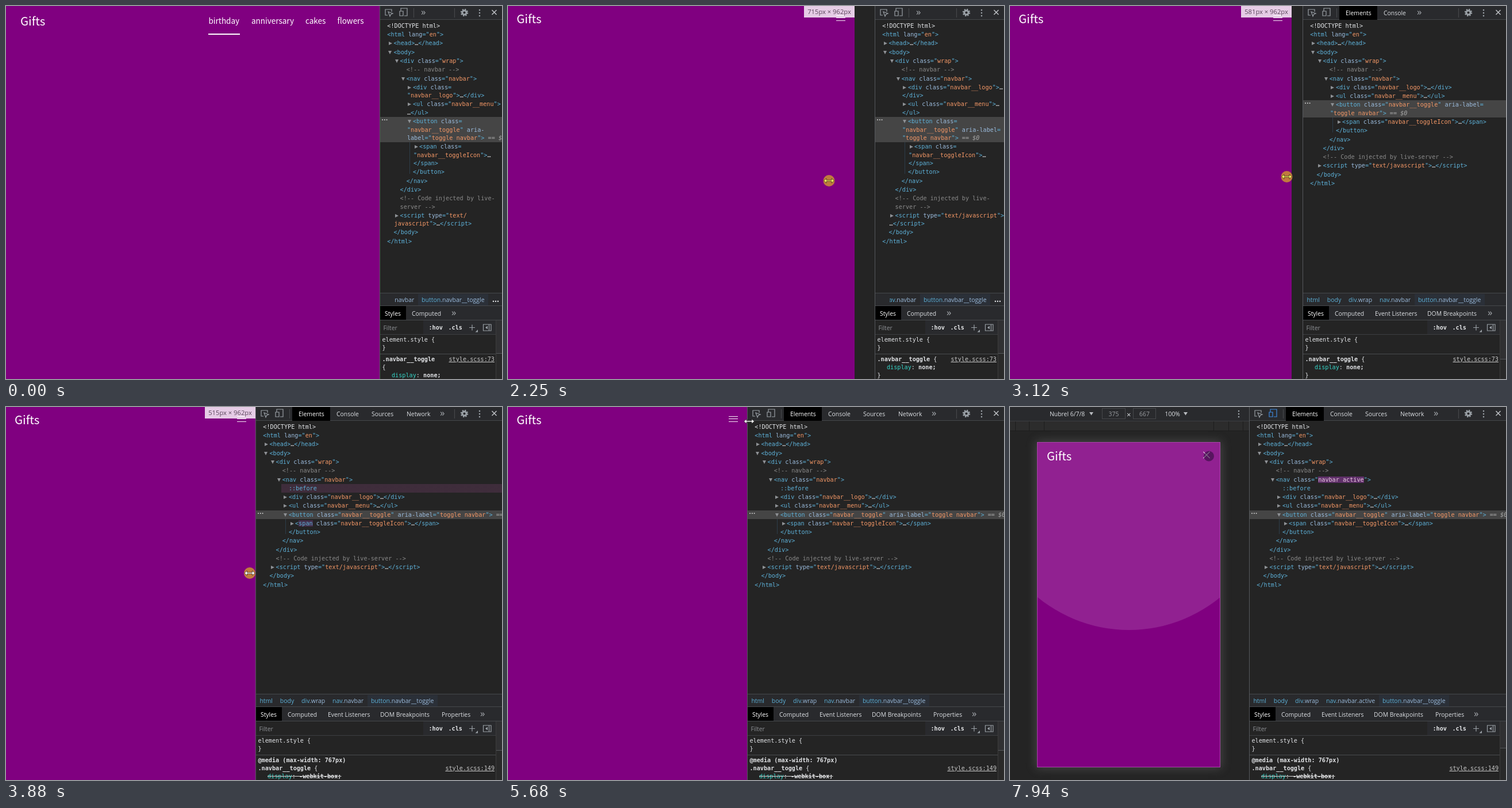
Write an HTML page that moves like this. It is 863x649 px and loops after 8 s.

```html
<!DOCTYPE html>
<html lang="en">
<head>
<meta charset="utf-8">
<title>Responsive navbar in the inspector</title>
<style>
html, body { margin: 0; width: 100%; height: 100%; overflow: hidden; background: #242424; }
#stage { position: relative; width: 863px; height: 649px; overflow: hidden; background: #242424;
  font: 10.4px/20px "Open Sans", "Noto Sans", sans-serif; color: #dcdfe3; }
#stage div, #stage svg, .at { position: absolute; }
#stage .tree div, #stage .rule div, #stage .crumbs div { position: relative; }
.at { white-space: pre; }
.hide { display: none !important; }
svg { overflow: visible; fill: none; stroke: #9aa0a6; stroke-width: 1.2; }

.page { background: purple; overflow: hidden; color: #fff;
  font-family: "Noto Sans CJK JP", "Noto Sans CJK SC", "Noto Sans", sans-serif; }
.page.device { border: 1px solid #a845a8; box-shadow: 0 0 16px 2px rgba(150, 150, 150, .3); }
.device .logo, .device .burger { transform: translate(1px, 1px); }
.logo { font-size: 20.4px; }
.menu { font-size: 13.5px; }
.line { left: 352px; top: 48px; width: 55px; height: 2px; background: #fff; }
.wave { border-radius: 50%; background: rgba(255, 255, 255, .13); }
.burger { top: 15px; width: 16px; height: 11px; }
.burger div { width: 16px; height: 1.2px; background: #f2e6f2; }
.badge { top: 0; width: 88px; height: 20px; background: rgba(255, 255, 255, .8); color: #5c465c;
  text-align: center; font: 11.2px/20px "Open Sans", sans-serif; }

.emu { width: 416px; height: 649px; background: #242424; }
.bar { left: 0; right: 0; background: #292a2d; box-sizing: border-box; }
.box { top: 2px; height: 17px; border: 1px solid #46484b; color: #9a9da1; line-height: 18px; text-align: center; }
.tick { top: 25px; width: 1px; height: 16px; background: #1d1d1d; }

.panel { top: 0; right: 0; bottom: 0; background: #242424; overflow: hidden; }
.edge { left: 0; top: 0; bottom: 0; width: 1px; background: #55585c; }
.sel { background: #000; color: #fff; }
.mono, .tree, .rule { font: 10.17px/14.4px "DejaVu Sans Mono", "Noto Sans Mono", monospace; }
.tree { left: 0; right: -2px; top: 27.1px; }
.tree div { padding: .87px 0 0; }
.t { color: #5db0d7; } .k { color: #9bbbdc; } .v { color: #f29766; } .c { color: #898989; }
.w { color: #e3e5e8; } .nw { white-space: nowrap; }
.tri { display: inline-block; width: 10px; height: 8px; }
.tri::before { content: ""; display: inline-block; border: solid transparent; border-width: 3.5px 0 3.5px 6px; border-left-color: #8e9195; margin-left: 1.5px; }
.tri.o::before { border-color: #8e9195 transparent transparent; border-width: 6px 3.5px 0; margin-left: 1px; }
.picked { background: #454545; }
.picked::before { content: "···"; position: absolute; left: 2px; top: -1px; color: #c8c8c8; letter-spacing: -2.4px; font-weight: bold; }
.picked em { position: absolute; white-space: pre; color: #a8a8a8; }
.guide { width: 1px; height: 28px; background: #2d3d4a; }
.crumbs { left: 1px; top: 501px; height: 20px; overflow: hidden; display: flex; font-size: 10.5px; }
.crumbs div { padding: 0 6.4px; flex: none; line-height: 21px; }
.crumbs div:last-child { background: #2b3038; }
.rule { left: 4.5px; right: 13px; line-height: 14px; color: #e0e2e5; }
.rule u { float: right; margin-left: 16px; color: #c6c6c6; }
.rule .p { padding-left: 16.5px; }
.p span { color: #35d4c7; }
.rule s { text-decoration-color: #ddd; }
</style>
</head>
<body>
<div id="stage">
  <div class="emu" id="emu"></div>
  <div class="page" id="page">
    <div class="wave" id="wave"></div>
    <div class="logo at" id="logo">Gifts</div>
    <div class="menu" id="menu"><div class="line"></div></div>
    <div class="burger" id="burger"><div></div><div></div><div></div></div>
  </div>
  <div class="badge at" id="badge"></div>
  <div class="panel" id="panel">
    <div class="bar" style="top:0;height:24px;border-bottom:1px solid #45484b"></div>
    <svg id="tools" width="70" height="24">
      <path d="M21 10V6H10v10h4M15 10l8 3-3.4 1.4L18 18z"/>
      <path id="dev" d="M37 9V4h11v13h-5M35 9h6v8h-6z"/>
      <path d="M59.5 4v16" stroke="#46484b"/>
    </svg>
    <div class="tree" id="tree"></div>
    <div class="guide" id="guide"></div>
    <div class="bar" style="top:499px;height:23px;border:solid #45484b;border-width:1px 0"></div>
    <div class="crumbs" id="crumbs"></div>
    <div class="bar" id="cover" style="top:501px;width:26px;height:20px"></div>
    <div class="bar" style="top:522px;height:25px;border-bottom:1px solid #45484b"></div>
    <div class="bar" style="top:547px;height:25px;border-bottom:1px solid #3c3e41;background:#242424"></div>
    <div id="tabs" style="left:0;top:0"></div>
    <div class="rule" style="top:574px">element.style {<br>}</div>
    <div style="left:0;right:11px;top:605px;height:1px;background:#4a4c4f"></div>
    <div class="rule" id="plain" style="top:608px"><u>style.scss:73</u><b>.navbar__toggle</b> {<div class="p"><span>display</span>: <b>none;</b></div>}</div>
    <div class="rule" id="media" style="top:608px"><b>@media (max-width: 767px)</b><br><u>style.scss:149</u><b>.navbar__toggle</b> {<div class="p"><s><span>display</span>: <b>-webkit-box;</b></s></div></div>
    <div class="edge"></div>
  </div>
  <div id="right" style="left:0;top:0"></div>
  <svg id="cursor" width="1" height="1">
    <circle id="ring" r="10" stroke="none"/>
    <path id="arrow" d="M0 0V14.5L3.4 11.4 5.6 16.6 8 15.6 5.8 10.5H10.4Z" fill="#fff" stroke="#222" stroke-width=".8"/>
    <path id="resize" d="M-9 0l4.500-4v3h9v-3l4.500 4-4.500 4v-3h-9v3z" stroke="#111" stroke-width=".6"/>
  </svg>
</div>
<script>
const $ = id => document.getElementById(id);
const show = (el, on) => el.classList.toggle('hide', !on);
const put = (box, x, y, text, cls = '', css = '') => {
  const el = document.createElement('div');
  el.className = 'at ' + cls;
  el.style.cssText = `left:${x}px;top:${y - 10}px;line-height:20px;${css}`;
  el.innerHTML = text;
  $(box).append(el);
  return el;
};

// Page and emulator
[['birthday', 352.5], ['anniversary', 427], ['cakes', 521], ['flowers', 576.5]]
  .forEach(([word, x]) => put('menu', x, 24.5, word));
const drop = x => `<svg style="left:${x}px;top:9px" width="8" height="6"><path d="M0 0h7l-3.5 5.5z" fill="#b8bbbf" stroke="none"/></svg>`;
$('emu').innerHTML = `<div class="bar" style="top:0;height:25px;border-bottom:1px solid #3c3e41"></div>
  <div class="bar" style="top:25px;height:17px;background:#2c2c2c;border-bottom:1px solid #1d1d1d"></div>
  <div class="box" style="left:160px;width:39px">375</div><div class="box" style="left:214px;width:38px">667</div>
  ${drop(137.5)}${drop(301.5)}` +
  [9, 33, 59, 354, 380, 405].map(x => `<div class="tick" style="left:${x}px"></div>`).join('');
put('emu', 69, 12, 'Nubrel 6/7/8');
put('emu', 203, 12.5, '×', '', 'font-size:13px');
put('emu', 269.5, 12, '100%');
const dots = x => `<svg style="left:${x}px;top:11.5px" width="1" height="1"><path d="M0-5v.1M0 0v.1M0 5v.1" stroke-width="2.6" stroke-linecap="round"/></svg>`;
$('emu').insertAdjacentHTML('beforeend', dots(398));

// Element tree
const s = (c, x) => `<span class="${c}">${x}</span>`;
const open = (name, ...attrs) => s('t', '&lt;' + name + attrs.map(([k, v, id]) =>
  ` ${s('k', k)}=<wbr>"<span class="v"${id ? ` id="${id}"` : ''}>${v.replace('/', '/<wbr>')}</span>"`).join('') + '&gt;');
const close = name => s('t nw', `&lt;/${name}&gt;`);
const folded = (name, ...attrs) => open(name, ...attrs) + '<wbr>' + s('w', '…') + '<wbr>' + close(name);
const row = (depth, html, fold = '', id = '') => {
  const pad = 13.3 + 11.15 * depth - (fold ? 10 : 0);
  const mark = fold ? `<span class="tri ${fold}"></span>` : '';
  return `<div id="${id}" class="${id === 'picked' ? id : ''}" style="padding-left:${pad}px">${mark}${html}</div>`;
};
const cls = (v, id) => ['class', v, id];
$('tree').innerHTML = [
  row(0, s('w', '&lt;!DOCTYPE html&gt;'), '', 'doctype'),
  row(0, open('html', ['lang', 'en'])),
  row(1, folded('head'), 'f'),
  row(1, open('body'), 'o'),
  row(2, open('div', cls('wrap')), 'o'),
  row(3, s('c', '&lt;!-- navbar --&gt;')),
  row(3, open('nav', cls('navbar', 'navClass')), 'o'),
  row(4, s('t', '::before'), '', 'before'),
  row(4, folded('div', cls('navbar__logo')), 'f'),
  row(4, folded('ul', cls('navbar__menu')), 'f'),
  row(4, open('button', cls('navbar__toggle'), ['aria-label', 'toggle navbar']) + '<em> == $0</em>', 'o', 'picked'),
  row(5, folded('span', cls('navbar__toggleIcon'))
    .replace('&lt;span', '&lt;<span id="spanName">span</span>'), 'f'),
  row(4, close('button'), '', 'buttonEnd'),
  row(3, close('nav')),
  row(2, close('div')),
  row(2, s('c', '&lt;!-- Code injected by live-server --&gt;')),
  row(2, folded('script', ['type', 'text/javascript']), 'f'),
  row(1, close('body')),
  row(0, close('html'))
].join('');
$('crumbs').innerHTML = ['html', 'body', 'div.wrap', 'nav.navbar', 'button.navbar__toggle'].map(c => {
  const [tag, name] = c.split('.');
  return `<div>${s('t', tag)}${name ? s('k', '.' + name) : ''}</div>`;
}).join('');
const navCrumb = $('crumbs').children[3].lastChild;

// Tabs: label, text start, end of its room
const topTabs = [['Elements', 75, 130], ['Console', 141, 191], ['Sources', 202, 252], ['Network', 263, 313]];
const lowTabs = [['Styles', 9, 38], ['Computed', 56, 108], ['Event Listeners', 126, 200],
  ['DOM Breakpoints', 217, 305], ['Properties', 324, 374]];
const topSel = put('tabs', 64, 10, '', 'sel', 'width:66px;height:24px');
put('tabs', 1, 532, '', 'sel', 'width:45px;height:24px');
const addTab = y => ([label, x], i) => put('tabs', x, y, label, '', i ? '' : 'color:#fff');
const topEls = topTabs.map(addTab(11.5)), lowEls = lowTabs.map(addTab(534.5));
const more = y => put('tabs', 0, y, '»', '', 'font-size:17px;color:#a5a9ae');
const topMore = more(9.5), lowMore = more(532.5);
put('tabs', 6.5, 560, 'Filter', '', 'color:#8f9296');

// Parts anchored to the right border
$('right').innerHTML = `<div style="left:726px;top:547px;width:137px;height:24px;background:#292a2d"></div>
  <div style="left:852px;top:547px;width:10px;height:102px;background:#292929;border-left:1px solid #3c3c3c"></div>
  <div id="thumb" style="left:853px;top:547px;width:10px;background:#303032;border-bottom:1px solid #55585c"></div>
  <svg width="863" height="649">
    <path d="M780.5 4v16" stroke="#46484b"/>
    <circle cx="797.5" cy="11.5" r="3.6" stroke-width="3"/>
    <circle cx="797.5" cy="11.5" r="5.6" stroke-width="2.2" stroke-dasharray="2.2"/>
    <path d="M845.5 7l8 8m0-8l-8 8" stroke="#bfc2c6" stroke-width="1.5"/>
    <path d="M806 559.5h10m-5-5v10M830.5 554h13.5v11h-13.5zM840.5 554v11"/>
    <path d="M821 563v4.500h-4.500zM838 556.500v6l-4-3z" fill="#9aa0a6" stroke="none"/>
  </svg>` + dots(824);
['.cls', ':hov'].forEach((c, i) => put('right', 769.5 - 34 * i, 560, c, 'mono', 'font-weight:bold;color:#e4e6e8'));
const dotsMore = put('right', 846, 510, '…', '', 'font:bold 14px/20px "Open Sans",sans-serif;color:#e4e6e8');

// Motion: time, then the values at that time
const layout = [[1870, 650, 650], [1950, 640, 650], [2250, 602.5, 638], [2320, 602.5, 638], [2630, 540, 575],
  [2700, 540, 575], [3120, 489.5, 509], [3190, 489.5, 509], [3420, 478, 480], [3510, 478, 480],
  [3880, 434, 434], [3970, 434, 434], [4290, 420, 420], [4380, 420, 420], [4600, 416, 416]];
const pointer = [[200, 863, 640], [980, 648, 308], [1150, 647, 307], [1299, 647, 307], [1300, 651, 305],
  [1870, 651, 305], [2250, 558.5, 304], [2320, 558.5, 304], [2630, 520, 301], [3120, 481.5, 297],
  [3190, 481.5, 297], [3420, 466, 294], [3880, 424, 289], [3970, 424, 289], [4290, 414, 288],
  [4550, 416, 285], [4850, 383, 115], [5140, 405, 28], [5450, 405, 28], [5680, 419.5, 25],
  [5760, 419.5, 25], [6000, 455, 11], [6350, 455, 11], [6790, 422, 59], [6850, 422, 59],
  [7010, 358, 75], [7270, 341, 77], [7469, 341, 77], [7470, 346, 85.5]];
const clamp = x => Math.max(0, Math.min(1, x));
const at = (keys, t) => {
  const i = keys.findIndex(k => k[0] > t);
  if (i < 1) return (i ? keys[keys.length - 1] : keys[0]).slice(1);
  const a = keys[i - 1], b = keys[i], f = (t - a[0]) / (b[0] - a[0]);
  return a.slice(1).map((v, n) => v + (b[n + 1] - v) * f);
};
const within = (t, a, b) => t >= a && t < b;

function fitTabs(els, tabs, left, room, limit, more, start, gap) {
  let end = start;
  els.forEach((el, i) => {
    const fits = left + tabs[i][2] + room <= limit;
    show(el, fits);
    if (fits) end = tabs[i][2];
  });
  more.style.left = end + gap - 5 + 'px';
}

function drawPage(t, edge, emulated) {
  const page = $('page'), wide = edge > 647 && !emulated;
  const width = emulated ? 317 : Math.round(edge);
  page.classList.toggle('device', emulated);
  page.style.cssText = emulated ? 'left:47px;top:61px;width:317px;height:564px'
    : `left:0;top:0;width:${width}px;height:649px`;
  $('logo').style.cssText = `left:${wide ? 25 : 15}px;top:${wide ? 15 : 10.7}px`;
  show($('menu'), wide);
  show($('burger'), !wide);
  $('burger').style.left = width - 32 + 'px';
  const turn = clamp((t - 7600) / 300);
  [...$('burger').children].forEach((bar, i) => {
    const side = i - 1;
    bar.style.top = 5 + side * 4.5 * (1 - turn) + 'px';
    bar.style.transform = `rotate(${-45 * side * turn}deg)`;
    bar.style.opacity = side ? 1 : 1 - turn;
  });
  const r = 250 * clamp((t - 7580) / 360);
  $('wave').style.cssText = `left:${158.5 - r}px;top:${76 - r}px;width:${2 * r}px;height:${2 * r}px`;
  show($('badge'), within(t, 1900, 5220));
  $('badge').style.left = width - 88 + 'px';
  $('badge').textContent = Math.round(edge / .8425) + 'px × 962px';
}

function drawPanel(t, left, emulated) {
  const media = t >= 3700, active = t >= 7620, overflow = left > 540;
  $('panel').style.left = Math.round(left) + 'px';
  fitTabs(topEls, topTabs, left, 28, 781, topMore, 64, 13);
  show(topSel, !topEls[0].classList.contains('hide'));
  fitTabs(lowEls, lowTabs, left, 35, 863, lowMore, 108, 22);
  $('dev').style.stroke = emulated ? '#3f8ae0' : '';

  show($('before'), media);
  const glow = clamp((4400 - t) / 520);
  $('before').style.background = `linear-gradient(90deg, transparent 45px, rgba(110,60,100,${.36 * glow}) 45px)`;
  $('spanName').style.background = `rgba(120,65,140,${media ? .38 * glow : 0})`;
  $('doctype').style.background = within(t, 6700, 6900) ? '#262d3a' : '';
  $('navClass').textContent = active ? 'navbar active' : 'navbar';
  $('navClass').style.cssText = active ? 'background:#5f3069;color:#e9c9e0' : '';
  const top = $('picked').offsetTop + $('picked').offsetHeight;
  $('guide').style.cssText = `left:52px;top:${27 + top}px;height:${$('buttonEnd').offsetTop - top + 11}px`;

  navCrumb.textContent = active ? '.navbar.active' : '.navbar';
  $('crumbs').style.width = 838 - left + 'px';
  $('crumbs').style.justifyContent = overflow ? 'flex-end' : 'flex-start';
  show($('cover'), overflow);
  show(dotsMore, overflow);
  show($('plain'), !media);
  show($('media'), media);
  $('thumb').style.height = (active ? 46 : media ? 50 : overflow ? 57 : 67) + 'px';
}

function drawCursor(t) {
  const [x, y] = at(pointer, t);
  const drag = within(t, 1680, 4500), press = t >= 7470;
  const sizing = within(t, 1300, 4600) || within(t, 5600, 5780);
  show($('cursor'), t >= 200);
  $('cursor').style.transform = `translate(${x}px,${y}px)`;
  show($('ring'), drag || press);
  $('ring').setAttribute('fill', press ? 'rgba(30,10,45,.5)' : '#c07a3e');
  $('ring').setAttribute('r', press ? 9 : 10);
  show($('resize'), sizing);
  $('resize').setAttribute('fill', within(t, 1680, 3500) ? '#f2ee58' : '#fff');
  show($('arrow'), !sizing && !press);
}

const start = performance.now();
function frame() {
  const t = (performance.now() - start) % 8000;
  const [edge, left] = at(layout, t), emulated = t >= 6310;
  show($('emu'), emulated);
  drawPage(t, edge, emulated);
  drawPanel(t, left, emulated);
  drawCursor(t);
  requestAnimationFrame(frame);
}
frame();
</script>
</body>
</html>
```
